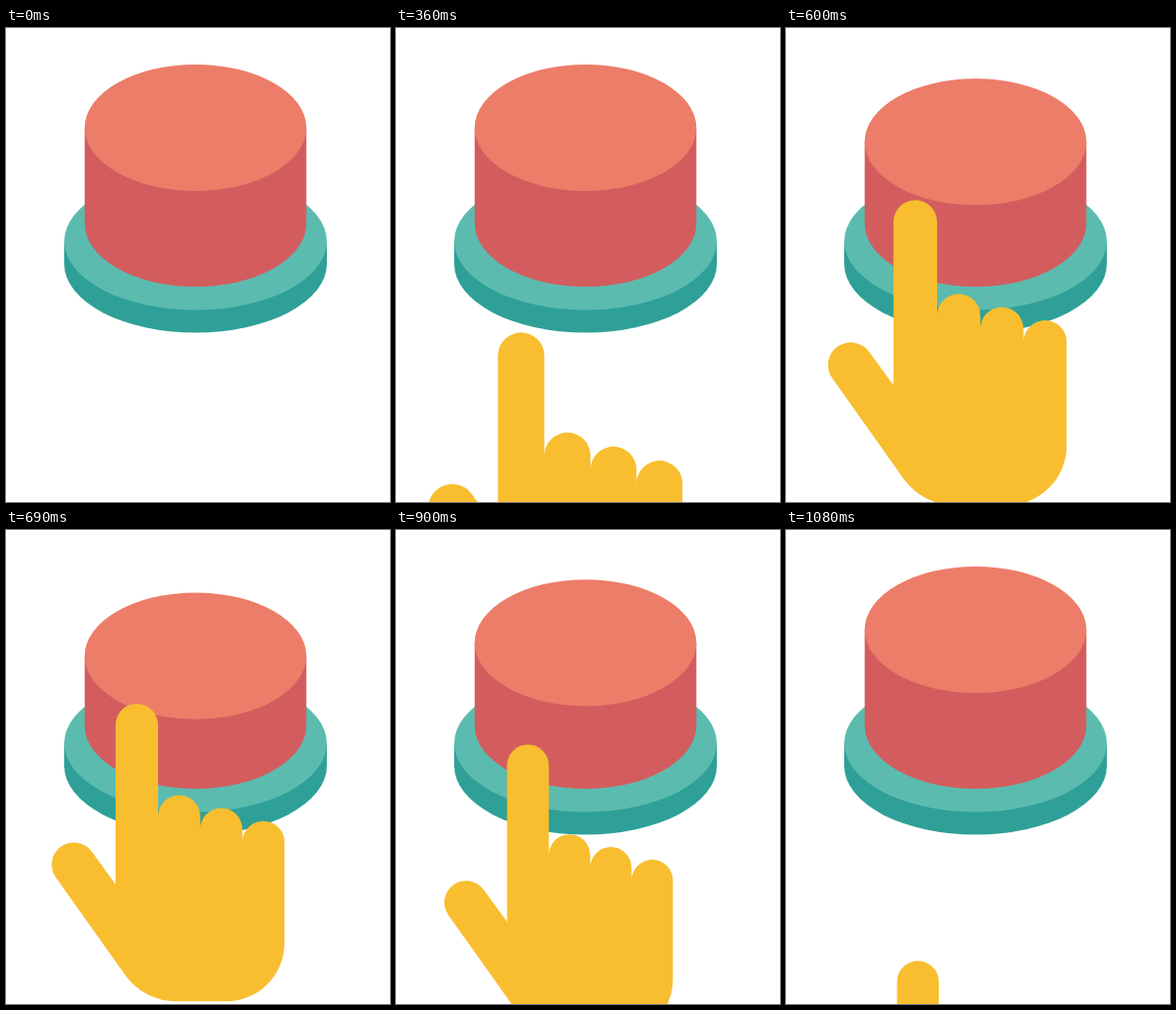
Animation, 389 px wide and 480 px high, one loop 1.11 s. Source, as an HTML page with a canvas:

```html
<!DOCTYPE html>
<html lang="en">
<head>
<meta charset="utf-8">
<title>Button press</title>
<style>
  html, body { margin: 0; width: 100%; height: 100%; overflow: hidden; background: #fff; }
  canvas { display: block; width: 389px; height: 480px; }
</style>
</head>
<body>
<canvas id="stage" width="389" height="480"></canvas>
<script>
const ctx = document.getElementById('stage').getContext('2d');
const W = 389, H = 480, LOOP = 1110, STEP = 30;
const CX = 192;
const start = performance.now();

const clamp = v => Math.max(0, Math.min(1, v));
const ramp = (t, from, to) => clamp((t - from) / (to - from));

// Upright cylinder: side wall first, then the lid.
function cylinder(rx, ry, top, bottom, side, lid) {
  ctx.fillStyle = side;
  ctx.beginPath();
  ctx.moveTo(CX - rx, top);
  ctx.lineTo(CX - rx, bottom);
  ctx.ellipse(CX, bottom, rx, ry, 0, Math.PI, 0, true);
  ctx.lineTo(CX + rx, top);
  ctx.fill();
  ctx.fillStyle = lid;
  ctx.beginPath();
  ctx.ellipse(CX, top, rx, ry, 0, 0, Math.PI * 2);
  ctx.fill();
}

function hand(dy, scale) {
  ctx.save();
  ctx.translate(W / 2, H / 2 + dy);
  ctx.scale(scale, scale);
  ctx.translate(-W / 2, -H / 2);
  ctx.fillStyle = '#f8be2f';
  ctx.beginPath();
  // index finger
  ctx.moveTo(112.5, 356.5);
  ctx.arc(133.65, 198.2, 21.15, Math.PI, 0);
  // folded fingers
  for (let i = 0; i < 3; i++) {
    ctx.arc(175.75 + i * 41.9, 289 + i * 12.8, 20.95, Math.PI, 0);
  }
  // palm
  ctx.arcTo(280.5, 473, 220, 473, 58);
  ctx.arcTo(140.7, 473, 53, 349.8, 62);
  // thumb
  const lean = Math.atan2(0.815, 0.58);
  ctx.arc(71, 337, 22, lean + Math.PI / 2, lean - Math.PI / 2);
  ctx.closePath();
  ctx.fill();
  ctx.restore();
}

function draw(t) {
  const press = 26.5 * (ramp(t, 530, 660) - ramp(t, 850, 950));
  const dy = 346 * (1 - ramp(t, 0, 600)) + 1.217 * Math.max(0, t - 867);
  const scale = 1 + 0.216 * (1 - ramp(t, 0, 755));
  ctx.fillStyle = '#fff';
  ctx.fillRect(0, 0, W, H);
  cylinder(133, 69.5, 216, 239, '#2ea098', '#5cbbaf');
  cylinder(112.3, 64, 101 + press, 198, '#d35d5e', '#ec7d68');
  if (t >= 60) hand(dy, scale);
}

function tick() {
  const t = (performance.now() - start) % LOOP;
  draw(Math.floor(t / STEP) * STEP);
  requestAnimationFrame(tick);
}
tick();
</script>
</body>
</html>
```
